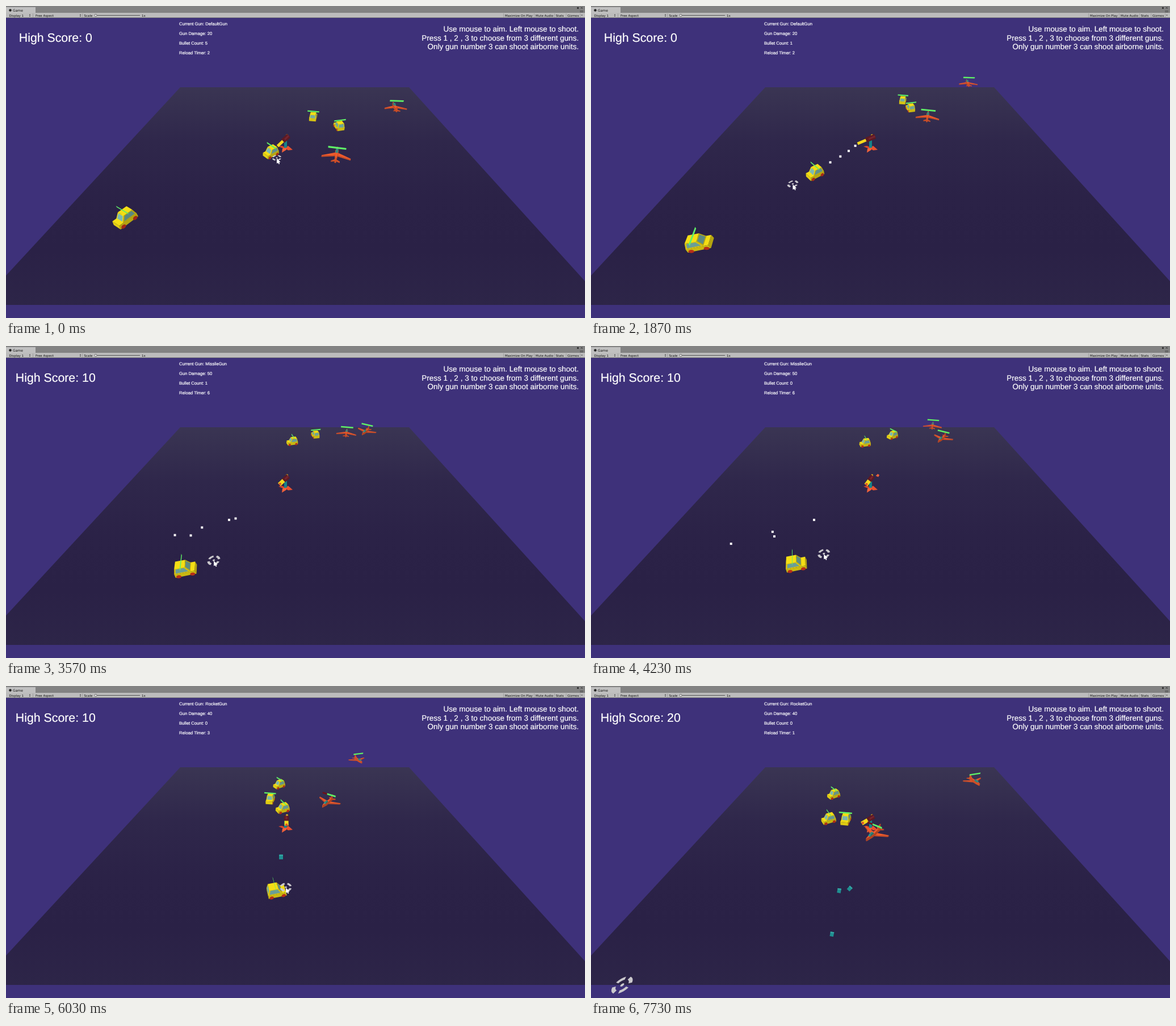
Write an HTML page with a canvas that moves like this. It is 1020 by 549 pixels and loops after 7.76 s.

```html
<!DOCTYPE html>
<html lang="en">
<head>
<meta charset="utf-8">
<title>Turret game</title>
<style>
html, body { margin: 0; width: 100%; height: 100%; overflow: hidden; background: #3e317a; }
canvas { display: block; }
</style>
</head>
<body>
<canvas id="stage" width="1020" height="549"></canvas>
<script>
const ctx = document.getElementById('stage').getContext('2d');
const LOOP = 7760;

// ---- Camera: 10 units above the ground, pitched down ----
const FOCAL = 457, CX = 510, CY = 275, EYE = 10;
const PITCH = 37.6 * Math.PI / 180, COS = Math.cos(PITCH), SIN = Math.sin(PITCH);

const depthOf = ([, y, z]) => z * COS + (EYE - y) * SIN;
function project(p) {
  const [x, y, z] = p, scale = FOCAL / depthOf(p);
  return [CX + scale * x, CY + scale * ((EYE - y) * COS - z * SIN)];
}
function unproject([sx, sy], height = 0) {
  const u = (sx - CX) / FOCAL, v = (sy - CY) / FOCAL;
  const d = (EYE - height) / (SIN + v * COS);
  return [d * u, height, d * (COS - v * SIN)];
}

// ---- Small helpers ----
const range = n => [...Array(n).keys()];
const clamp = (v, lo, hi) => Math.min(hi, Math.max(lo, v));
const lerp = (a, b, f) => a.map((v, i) => v + (b[i] - v) * f);
const sub = (a, b) => a.map((v, i) => v - b[i]);
const dot = (a, b) => a.reduce((s, v, i) => s + v * b[i], 0);
const mean = pts => [0, 1, 2].map(i => pts.reduce((s, p) => s + p[i], 0) / pts.length);
const unit = v => { const len = Math.hypot(...v) || 1; return v.map(c => c / len); };
function normal([a, b, c]) {
  const p = sub(b, a), q = sub(c, a);
  return unit([p[1] * q[2] - p[2] * q[1], p[2] * q[0] - p[0] * q[2], p[0] * q[1] - p[1] * q[0]]);
}
function poly(pts, color) {
  ctx.beginPath();
  pts.forEach(p => ctx.lineTo(...p));
  ctx.closePath();
  ctx.fillStyle = color;
  ctx.fill();
}
function line(a, b, color, width) {
  ctx.beginPath();
  ctx.moveTo(...a);
  ctx.lineTo(...b);
  ctx.strokeStyle = color;
  ctx.lineWidth = width;
  ctx.stroke();
}
function rect(x, y, w, h, color) {
  ctx.fillStyle = color;
  ctx.fillRect(x, y, w, h);
}
function circle([x, y], r, color) {
  ctx.beginPath();
  ctx.arc(x, y, r, 0, 7);
  ctx.fillStyle = color;
  ctx.fill();
}
function text(str, x, y, font, color, align = 'left') {
  ctx.textRendering = 'geometricPrecision';
  ctx.font = font;
  ctx.textAlign = align;
  ctx.fillStyle = color;
  ctx.fillText(str, x, y);
}

// ---- Models: faces in drawing order; x right, y up, z forward ----
const YELLOW = [250, 228, 22], GLASS = [126, 188, 178], RED = [225, 58, 30];
const ORANGE = [244, 92, 44], TEAL = [40, 145, 140];

const face = (color, pts, inside) =>
  ({ color, pts: dot(normal(pts), sub(mean(pts), inside)) < 0 ? pts.slice().reverse() : pts });

// Convex solid between two outlines of [x, z] points.
function solid(color, low, y0, high, y1, glass) {
  const at = (outline, y) => outline.map(([x, z]) => [x, y, z]);
  const a = at(low, y0), b = at(high, y1), inside = mean([...a, ...b]);
  const faces = [face(color, b, inside)];
  a.forEach((p, i) => {
    const j = (i + 1) % a.length, side = [p, a[j], b[j], b[i]], mid = mean(side);
    faces.push(face(color, side, inside));
    if (glass) faces.push(face(glass, side.map(q => lerp(mid, q, 0.78)), inside));
  });
  return faces;
}
const mirror = outline => outline.map(([x, z]) => [-x, z]);
const both = half => [...half, ...mirror(half).reverse()];
const box = (w, z0, z1) => both([[w, z0], [w, z1]]);
const wheel = (x, z) => face(RED, range(10).map(i =>
  [x, 0.11 + 0.11 * Math.sin(i * 0.628), z + 0.11 * Math.cos(i * 0.628)]), [0, 0.11, z]);

const CAR = [
  ...solid(YELLOW, box(0.27, -0.45, 0.46), 0.07, box(0.27, -0.45, 0.43), 0.3),
  ...[-0.28, 0.28].flatMap(x => [-0.3, 0.3].map(z => wheel(x, z))),
  ...solid(YELLOW, box(0.26, -0.45, 0.24), 0.3, box(0.22, -0.38, 0.06), 0.6, GLASS)
];
const wing = [[0, 0.2], [0.75, -0.22], [0.75, -0.3], [0, -0.08]];
const tail = wing.map(([x, z]) => [x * 0.3, z * 0.4 - 0.5]);
const hull = both([[0.02, 0.66], [0.09, 0.25], [0.04, -0.6]]);
const PLANE = [
  ...[wing, mirror(wing), tail, mirror(tail)].flatMap(o => solid(ORANGE, o, -0.03, o, 0.03)),
  ...solid(ORANGE, hull, -0.08, hull, 0.08),
  ...solid(TEAL, box(0.07, 0.08, 0.42), 0.08, box(0.05, 0.12, 0.32), 0.17),
  ...solid(ORANGE, box(0.02, -0.58, -0.3), 0.08, box(0.015, -0.62, -0.5), 0.28)
];

const LIGHT = [-0.35, 0.85, -0.4];
function drawModel(model, place) {
  for (const { color, pts } of model) {
    const world = pts.map(place), n = normal(world);
    if (dot(n, sub([0, EYE, 0], world[0])) <= 0) continue;
    const shade = 0.72 + 0.3 * Math.max(0, dot(n, LIGHT));
    poly(world.map(project), `rgb(${color.map(c => Math.min(255, c * shade))})`);
  }
}

// ---- Vehicles: steady straight legs over the ground between [time, x, y] points ----
const fullHealth = () => 1;
function vehicle(model, height, barY, legs, health = fullHealth, to = LOOP) {
  const points = legs.map(([time, ...p]) => ({ time, pos: unproject(p, height) }));
  const at = t => {
    const i = points.length > 2 && t > points[1].time ? 1 : 0, a = points[i], b = points[i + 1];
    return lerp(a.pos, b.pos, (t - a.time) / (b.time - a.time));
  };
  return { model, barY, health, at, from: points[0].time, to };
}
// The waypoint of a car is its middle on screen; its ground point lies a little lower.
const car = (legs, ...rest) => vehicle(CAR, 0, 0.74, legs.map(([t, x, y]) => [t, x, y + (y + 77) * 0.009]), ...rest);
const plane = (legs, ...rest) => vehicle(PLANE, 2, 0.5, legs, ...rest);

const MISSILE_FIRED = 3850, MISSILE_HIT = 5450, CAR_LOST = 2500, ROCKET_HIT = 6300;
const target = plane([[0, 685, 178], [2250, 660, 129], [LOOP, 497, 261]], t => t < MISSILE_HIT ? 1 : 0.65);
const vehicles = [
  target,
  plane([[0, 582, 262], [5450, 605, 120], [LOOP, 676, 168]]),
  car([[0, 213, 375], [1150, 139, 429], [ROCKET_HIT, 493, 359]], fullHealth, ROCKET_HIT),
  car([[0, 467, 260], [CAR_LOST, 368, 310]], t => 1 - 0.2 * clamp(Math.floor((t - 1900) / 120), 0, 4), CAR_LOST),
  car([[0, 541, 197], [2100, 550, 165], [4350, 479, 174], [LOOP, 449, 237]].slice(0, 3), fullHealth, 4350),
  car([[4350, 479, 174], [LOOP, 449, 238]]),
  car([[0, 586, 213], [3750, 543, 156], [LOOP, 427, 194]]),
  car([[5000, 525, 208], [LOOP, 418, 237]])
];

function drawVehicle(v, t) {
  const pos = v.at(t), [fx, , fz] = unit(sub(v.at(t + 20), v.at(t - 20)));
  const place = ([x, y, z]) => [pos[0] + x * fz + z * fx, pos[1] + y, pos[2] - x * fx + z * fz];
  drawModel(v.model, place);
  const bar = (x0, x1, color) => poly(
    [[x0, -1], [x1, -1], [x1, 1], [x0, 1]].map(([x, s]) => project(place([x, v.barY + s * 0.055, -0.08]))), color);
  const split = -0.46 + 0.92 * v.health(t);
  bar(split, 0.46, '#6e1018');
  bar(-0.46, split, '#5ff067');
}

// ---- Aim: mouse stops, joined by straight moves ----
const stops = [[0, 477, 267], [1070, 393, 297], [2630, 320, 328], [3570, 366, 377],
               [4870, 453, 354], [6030, 493, 354], [6500, 493, 354], [7150, 55, 526]];
const CURSOR_GONE = 7150;
function aimAt(t) {
  const i = stops.findIndex(s => s[0] > t);
  if (i < 0) return stops[stops.length - 1].slice(1);
  const a = stops[i - 1], b = stops[i];
  return lerp(a, b, (t - a[0]) / (b[0] - a[0])).slice(1);
}
function drawAim(t) {
  const [sx, sy] = aimAt(t), c = unproject([sx, sy]);
  const spot = (r, a) => project([c[0] + r * Math.cos(a), 0, c[2] + r * Math.sin(a)]);
  for (const q of range(4)) {
    const arc = range(5).map(i => Math.PI * (q / 2 + 0.25) + (i - 2) * 0.25);
    poly([...arc.map(a => spot(0.31, a)), ...arc.reverse().map(a => spot(0.195, a))], '#cac8cc');
  }
  poly(range(8).map(i => spot(0.06, i * Math.PI / 4)), '#cac8cc');
  if (t > CURSOR_GONE) return;
  const tip = [sx, sy + 1];
  line([sx + 2, sy + 6], [sx + 4.5, sy + 11], '#fff', 1.8);
  poly([tip, [sx, sy + 10], [sx + 6.5, sy + 7.5]], '#fff');
}

// ---- Guns: each empties its clip from "first" on, then reloads ----
const SHOT_GAP = 100;
const guns = [
  { name: 'DefaultGun', from: 0, damage: 20, clip: 5, reload: 2, first: 1500, length: 1.1 },
  { name: 'MissileGun', from: 3000, damage: 50, clip: 1, reload: 6, first: MISSILE_FIRED, length: 0.9 },
  { name: 'RocketGun', from: 5000, damage: 40, clip: 3, reload: 3, first: 5100, length: 0.9 }
];
const gunAt = t => guns.filter(g => t >= g.from).pop();
const bulletsLeft = (g, t) => g.clip - clamp(Math.floor((t - g.first) / SHOT_GAP) + 1, 0, g.clip);
const emptied = g => g.first + (g.clip - 1) * SHOT_GAP;
const reloadLeft = (g, t) => g.reload - Math.max(0, Math.floor((t - emptied(g)) / 1000));

// ---- Turret ----
const base = unproject([492, 252]), pivot = unproject([494, 232], 0.9);
function drawTurret(t) {
  const gun = gunAt(t), toAim = sub(unproject(aimAt(t)), base);
  const dir = unit([toAim[0], 0, toAim[2]]);
  const along = f => project(pivot.map((p, i) => p + dir[i] * gun.length * f));
  poly([[480, 247], [486, 246], [493, 249], [491, 252]], '#d9472b');
  poly([[505, 253], [497, 254], [491, 250], [497, 246]], '#e9512f');
  poly([[486, 258], [487, 251], [493, 248], [494, 253]], '#f4623a');
  poly([[490, 250], [490, 236], [495, 236], [495, 249]], '#168289');
  circle([495, 227.5], 2, '#e0b41e');
  line(along(-0.28), along(0.4), '#5c1a23', 8.5);
  line(along(-0.28), along(0.2), '#742431', 3);
  line(along(0.4), along(1), '#f3d71d', gun.clip < 5 ? 7 : 5);
  if (gun.clip < 5) circle(along(0.9), 2.2, '#d9532b');
}

// ---- Shots ----
const MUZZLE = [472, 240];

// Bullets pile up where the car was; the first ones bounce on, the last one misses it.
function drawBullets(t) {
  const gun = guns[0];
  range(gun.clip).forEach(i => {
    const age = t - gun.first - i * SHOT_GAP, missed = i === gun.clip - 1;
    if (age < 0 || t > 5500 - (i % 4) * 450) return;
    const heap = [370 + 11.5 * i, 311 - 2.5 * i];
    const drift = 0.077 * Math.max(0, 1 - i / 2) * Math.max(0, t - 2630);
    const [x, y] = missed
      ? lerp(MUZZLE, [323, 335], Math.min(1, age / 1700))
      : sub(lerp(MUZZLE, heap, Math.min(1, age / 750)), [drift, -drift * 0.3]);
    rect(x - 2, y - 2, 4, 4, '#f4f2f4');
  });
}
function drawMissile(t) {
  if (t < MISSILE_FIRED || t > MISSILE_HIT) return;
  const goal = project(target.at(MISSILE_HIT));
  const [x, y] = lerp([480, 240], goal, (t - MISSILE_FIRED) / (MISSILE_HIT - MISSILE_FIRED));
  poly([[x - 3.5, y + 0.5], [x, y - 3], [x + 3, y - 1], [x + 1, y + 2.5]], '#f0603c');
}
// Rockets leave as one stack and scatter when they hit the car.
function drawRockets(t) {
  const start = emptied(guns[2]);
  if (t < start) return;
  const hit = [482, 320], spread = (t - ROCKET_HIT) / (LOOP - ROCKET_HIT);
  [[436, 361], [455, 357], [423, 439]].forEach((end, i) => {
    ctx.save();
    ctx.translate(...(spread < 0
      ? lerp([491, 249], hit, (t - start) / (ROCKET_HIT - start))
      : lerp(hit, end, spread)));
    ctx.rotate(Math.max(0, spread) * (i === 1 ? 0.75 : 0.18));
    rect(-3, -4, 6.5, 8, '#1f8f91');
    rect(-3, -4, 6.5, 2, '#36a9a6');
    ctx.restore();
  });
}

// ---- Scenery and interface ----
const floor = ctx.createLinearGradient(0, 143, 0, 526);
['#3a3553', '#2f274b', '#2b2247', '#2a2146', '#2d2548'].forEach((c, i) => floor.addColorStop(i / 4, c));

function drawScene() {
  rect(0, 0, 1020, 549, '#3e317a');
  poly([[307, 143], [710, 143], [1058, 526], [-48, 526]], floor);
}

function drawEditorBars() {
  const label = (str, x, y = 18.5, size = 5.5) => text(str, x, y, `${size}px "DejaVu Sans", sans-serif`, '#111');
  const caret = (x, y, dir) => poly([[x - 1.2, y], [x + 1.2, y], [x, y + 2 * dir]], '#444');
  rect(0, 0, 1020, 12, '#828282');
  rect(0, 2, 52, 10, '#c0c0c0');
  rect(0, 12, 1020, 9, '#bcbcbc');
  rect(0, 20, 1020, 1, '#808080');
  circle([7.5, 7.5], 2.3, '#222');
  label('Game', 12, 9.7, 6);
  [['Display 1', 5.5], ['Free Aspect', 52], ['Scale', 137.5], ['1x', 239], ['Maximize On Play', 879],
   ['Mute Audio', 933], ['Stats', 968.5], ['Gizmos', 989]].forEach(l => label(...l));
  [47, 134.5, 876, 930, 966, 986.5, 1011].forEach(x => rect(x, 13, 0.7, 7, '#929292'));
  [42, 131].forEach(x => { caret(x, 16, -1); caret(x, 17, 1); });
  caret(1014.5, 15.5, 1);
  rect(157, 16, 79, 1, '#555');
  circle([158, 16.5], 2.4, '#666');
  circle([158, 16.5], 1.7, '#ddd');
  rect(1006, 2, 3, 3, '#333');
  line([1012.5, 1.5], [1016, 5], '#333', 0.8);
  line([1016, 1.5], [1012.5, 5], '#333', 0.8);
  [8, 10].forEach(y => rect(1011, y, 6, 0.8, '#444'));
}

function drawHud(t) {
  const gun = gunAt(t), score = 10 * [CAR_LOST, ROCKET_HIT].filter(lost => t >= lost).length;
  const hud = (str, x, y, size, align) => {
    text(str, x, y, `${size}px "Liberation Sans", Arial, sans-serif`, '#fff', align);
    ctx.strokeStyle = '#fff';
    ctx.lineWidth = 0.2;
    ctx.strokeText(str, x, y);
  };
  hud(`High Score: ${score}`, 87.3, 63, 21.3, 'center');
  [`Current Gun: ${gun.name}`, `Gun Damage: ${gun.damage}`,
   `Bullet Count: ${bulletsLeft(gun, t)}`, `Reload Timer: ${reloadLeft(gun, Math.min(t, gun.clip === 5 ? 2800 : t))}`]
    .forEach((str, i) => hud(str, 305, 33.5 + i * 17.1, 7.65, 'left'));
  ['Use mouse to aim. Left mouse to shoot.', 'Press 1 , 2 , 3 to choose from 3 different guns.',
   'Only gun number 3 can shoot airborne units.']
    .forEach((str, i) => hud(str, 1009, 45 + i * 15.6, 13.5, 'right'));
}

function render() {
  const t = performance.now() % LOOP;
  drawScene();
  const actors = vehicles.filter(v => t >= v.from && t < v.to)
    .map(v => ({ depth: depthOf(v.at(t)), draw: () => drawVehicle(v, t) }));
  actors.push({ depth: depthOf(base), draw: () => drawTurret(t) });
  actors.sort((a, b) => b.depth - a.depth).forEach(a => a.draw());
  drawBullets(t);
  drawMissile(t);
  drawRockets(t);
  drawAim(t);
  drawHud(t);
  drawEditorBars();
  requestAnimationFrame(render);
}
render();
</script>
</body>
</html>
```
